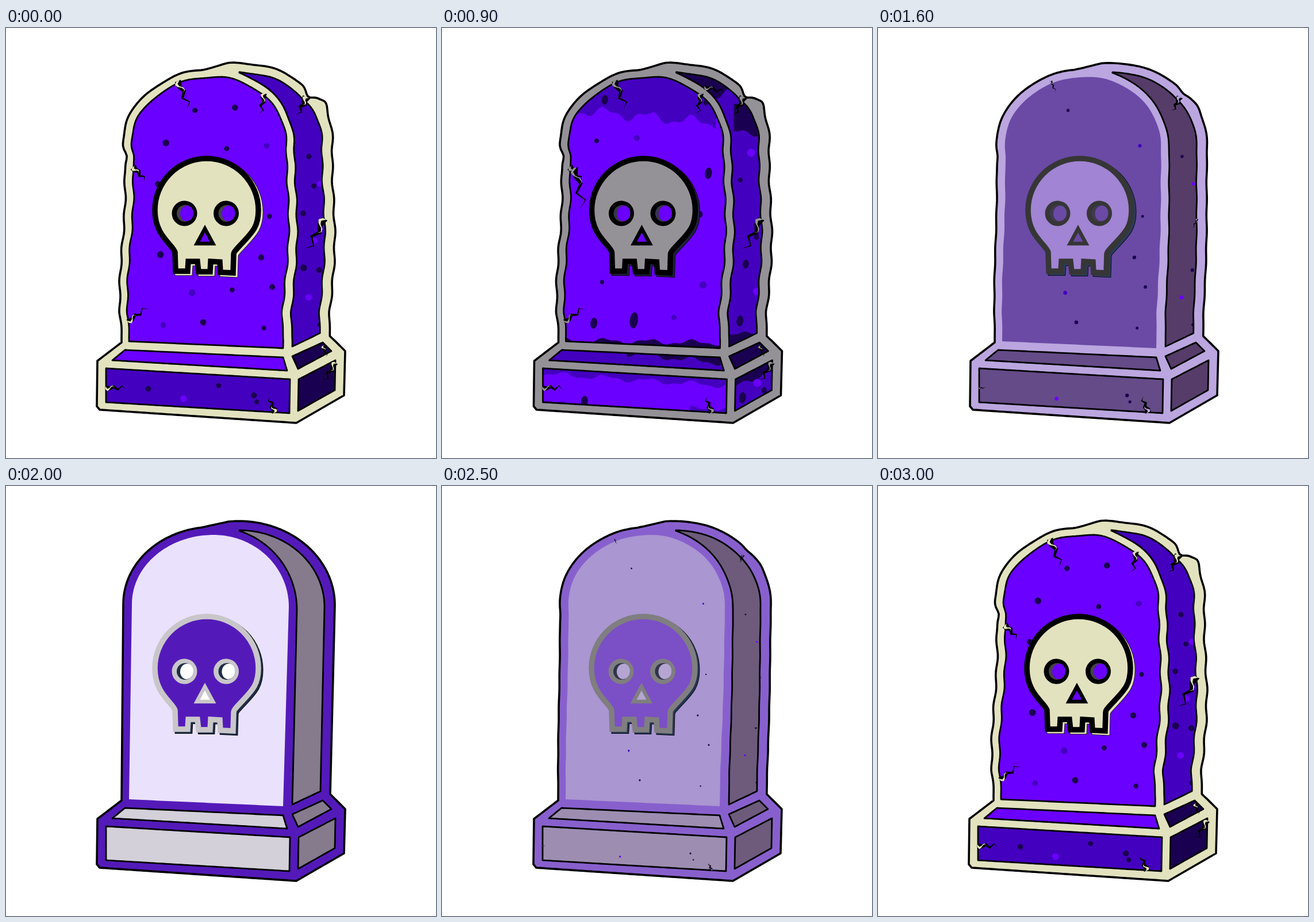
An HTML page with a canvas for the animation above (3.4 s loop, 748 px wide and 748 px high).

```html
<!DOCTYPE html>
<html lang="en">
<head>
<meta charset="utf-8">
<title>Ageing tombstone</title>
<style>
  html, body { margin: 0; width: 100%; height: 100%; overflow: hidden; background: #fff; }
  canvas { display: block; width: 100vmin; height: 100vmin; }
</style>
</head>
<body>
<canvas id="stage" width="748" height="748"></canvas>
<script>
const ctx = document.getElementById('stage').getContext('2d');
ctx.lineJoin = 'round';
const BRIGHT = '#6a00ff', MID = '#4400bf', DARK = '#1a0050';

// Lists of four run through the ages: ancient, old, worn, new.
const COLORS = {
  border:     ['#959297', '#e3e2bf', '#bba6e0', '#541ab9'],
  skull:      ['#959297', '#e3e2bf', '#a184d3', '#541ab9'],
  ink:        ['#000000', '#000000', '#363636', '#c9c6ca'],
  shadow:     ['#20203c', '#e3e2bf', '#2b3b58', '#1d2d45'],
  hollow:     ['#36364a', '#444444', '#403a50', '#1d2d45'],
  hole:       [BRIGHT, BRIGHT, '#6a4aa5', '#ffffff'],
  front:      [BRIGHT, BRIGHT, '#6a4aa5', '#eae2fc'],
  side:       [MID, MID, '#563c69', '#867a8d'],
  ledge:      [MID, BRIGHT, '#654b88', '#d4d0d9'],
  ledgeSide:  [DARK, DARK, '#563c69', '#867a8d'],
  plinth:     [BRIGHT, MID, '#654b88', '#d4d0d9'],
  plinthSide: [MID, DARK, '#563c69', '#867a8d']
};

const clamp = (v, lo, hi) => Math.min(hi, Math.max(lo, v));
const lerp = (a, b, k) => a + (b - a) * k;
const fract = v => v - Math.floor(v);

function arc(cx, cy, rx, ry, from, to) {
  return Array.from({ length: 31 }, (_, i) => {
    const a = lerp(from, to, i / 30) * Math.PI / 180;
    return [cx + rx * Math.cos(a), cy + ry * Math.sin(a)];
  });
}

const OUTLINE = [
  [201, 547], ...arc(361, 205, 157, 134, 180, 262), ...arc(405, 207, 167, 146, 264, 360),
  [564, 536], [590, 562], [588, 639], [505, 687], [163, 664], [158, 658], [159, 579]];

// box: area of the pits; grime: colour, wavy line from left to right, depth towards the edge
const PANELS = {
  front: {
    shape: [[214, 545], ...arc(361, 205, 142, 120, 180, 270), ...arc(361, 210, 131, 125, 270, 360), [482, 557]],
    box: [232, 100, 245, 440], pits: 20, holes: 17, tint: MID,
    grime: [[MID, 220, 142, 475, 166, -100], [DARK, 205, 543, 500, 548, 40]]
  },
  side: {
    shape: [...arc(406, 210, 148, 133, 270, 360), [547, 531], [498, 554], ...arc(361, 215, 145, 144, 360, 288)],
    box: [512, 190, 38, 340], pits: 9, holes: 6, tint: BRIGHT,
    grime: [[DARK, 400, 104, 500, 114, -80], [DARK, 506, 182, 570, 182, -50], [DARK, 490, 540, 560, 522, 40]]
  },
  ledge: {
    shape: [[207, 560], [482, 573], [489, 596], [185, 578]],
    grime: [[DARK, 320, 566, 495, 584, -40]]
  },
  ledgeSide: { shape: [[498, 571], [551, 547], [566, 562], [508, 593]] },
  plinth: {
    shape: [[174, 592], [494, 611], [493, 670], [174, 651]],
    box: [215, 612, 250, 40], pits: 5, holes: 1, tint: BRIGHT,
    grime: [[MID, 165, 601, 500, 623, -40], [MID, 165, 645, 225, 657, 30], [MID, 430, 662, 500, 662, 30]]
  },
  plinthSide: {
    shape: [[509, 611], [573, 578], [572, 630], [508, 666]],
    box: [515, 615, 50, 30], pits: 0, holes: 3, tint: BRIGHT,
    grime: [[DARK, 500, 628, 580, 592, -40]]
  }
};

// Broken spots of the slab: place, push, reach.
const DENTS = [[209, 222, 7, 0, 11], [529, 112, -5, 9, 11], [556, 138, 4, -8, 14]];

// Root, reach, root width, size in the worn age, size in the old age.
const CRACKS = [
  [299, 92, 20, 48, 11, .4, 1],
  [449, 114, -6, 36, 10, 0, 1],
  [221, 242, 22, 23, 12, 0, 1],
  [230, 243, 14, 72, 10, 0, 0],
  [523, 120, -15, 31, 14, .8, 1],
  [455, 103, 36, 8, 8, 0, 0],
  [554, 332, -30, 55, 12, .3, 1],
  [212, 511, 34, -25, 9, 0, 1],
  [173, 626, 36, 0, 9, .35, 1],
  [468, 669, -11, -27, 11, 1, 1],
  [573, 582, -20, 32, 10, 0, 1],
  [551, 553, 8, 18, 8, 0, 1]
];

const SKULL = new Path2D('M294 390C290 376 259 362 259 317A90 90 0 0 1 439 317C439 350 425 358 400 386Q396 390 396 394L395 426L373 425L372 407L356 406L355 424L335 424L333 406L317 406L316 423L295 423Z');
const NOSE = new Path2D('M346 349L332 375L360 375Z');

function along(values, age) {
  const i = clamp(Math.floor(age), 0, 2);
  return lerp(values[i], values[i + 1], age - i);
}

function colorAt(list, age) {
  const channel = k => clamp(Math.round(along(list.map(c => parseInt(c.substr(k, 2), 16)), age)), 0, 255);
  return `rgb(${channel(1)},${channel(3)},${channel(5)})`;
}

// Slow waves along the height plus the dents; the plinth stays straight.
function erode([x, y], rough) {
  const k = rough * clamp((545 - y) / 50, 0, 1);
  const upright = clamp((y - 90) / 120, 0, 1);
  let dx = upright * (4 * Math.sin(y / 54 + 2.48 - (x - 200) / 209) + 1.3 * Math.sin(y / 9));
  let dy = 1.3 * Math.sin(x / 13);
  for (const [px, py, pushX, pushY, reach] of DENTS) {
    const near = Math.exp(-((x - px) ** 2 + (y - py) ** 2) / reach ** 2);
    dx += pushX * near;
    dy += pushY * near;
  }
  return [x + dx * k, y + dy * k];
}

function polygon(pts) {
  const path = new Path2D();
  pts.forEach(p => path.lineTo(...p));
  path.closePath();
  return path;
}

function erodedShape(corners, rough) {
  const pts = [];
  corners.forEach((a, i) => {
    const b = corners[(i + 1) % corners.length];
    const parts = Math.ceil(Math.hypot(b[0] - a[0], b[1] - a[1]) / 6) || 1;
    for (let j = 0; j < parts; j++) {
      pts.push(erode([lerp(a[0], b[0], j / parts), lerp(a[1], b[1], j / parts)], rough));
    }
  });
  return polygon(pts);
}

function fill(path, color) {
  ctx.fillStyle = color;
  ctx.fill(path);
}

function stroke(path, color, width) {
  ctx.strokeStyle = color;
  ctx.lineWidth = width;
  ctx.stroke(path);
}

function blob(x, y, color, rx, ry = rx) {
  if (rx <= 0) return;
  const path = new Path2D();
  path.ellipse(x, y, rx, ry, .12, 0, 7);
  fill(path, color);
}

// Evenly spread places from two irrational strides.
function scatter([x, y, w, h], count, seed, place) {
  for (let i = 1; i <= count; i++) {
    place(x + w * fract(seed + i * .7549), y + h * fract(seed + i * .5698), fract(i * .618), i);
  }
}

function drawGrime([color, x0, y0, x1, y1, depth], decay) {
  const hidden = (1 - decay) * Math.sign(depth) * 45;
  const edge = [[x1, y1 + depth], [x0, y0 + depth]];
  for (let i = 0; i <= 40; i++) {
    const x = lerp(x0, x1, i / 40);
    const size = Math.min(8, Math.abs(depth) / 10);
    edge.push([x, lerp(y0, y1, i / 40) + hidden + size * (Math.sin(x / 12) + .5 * Math.sin(x / 5))]);
  }
  fill(polygon(edge), color);
}

function drawPanel(name, age, rough, color) {
  const { shape, box, pits, holes, tint, grime = [] } = PANELS[name];
  const path = erodedShape(shape, rough);
  const decay = 1 - age;
  fill(path, color[name]);
  ctx.save();
  ctx.clip(path);
  if (decay > 0) grime.forEach(g => drawGrime(g, decay));
  if (box) {
    scatter(box, holes, .37, (x, y, size, i) => {
      const r = (3.5 + 4 * size) * decay;
      blob(x, y, i % 3 ? DARK : tint, r, r * (i % 3 ? 1 + size : 1));
    });
    scatter(box, pits, .11, (x, y, size, i) => {
      const r = 4 + 2 * size;
      blob(x, y, i % 3 ? DARK : tint, along([0, r, i % 2 ? r * .6 : 0, 0], age));
    });
  }
  ctx.restore();
  ctx.globalAlpha = name === 'front' ? clamp(along([1, 1, 0, 0], age), 0, 1) : 1;
  stroke(path, '#000', 2.8);
  ctx.globalAlpha = 1;
}

// A zigzag wedge that runs from full width to a point.
function wedge(x, y, dx, dy, width, part) {
  const length = Math.hypot(dx, dy), nx = -dy / length, ny = dx / length;
  const left = [], right = [];
  for (let i = 0; i <= 5; i++) {
    const t = i / 5 * part;
    const jag = length * .1 * Math.sin(t * 14);
    const half = width / 2 * (1 - i / 5);
    left.push([x + dx * t + nx * (jag + half), y + dy * t + ny * (jag + half)]);
    right.unshift([x + dx * t + nx * (jag - half), y + dy * t + ny * (jag - half)]);
  }
  return polygon(left.concat(right));
}

function drawCracks(age, color) {
  for (const [x, y, dx, dy, width, worn, old] of CRACKS) {
    const g = along([1, old, worn, 0], age);
    if (g <= 0) continue;
    fill(wedge(x, y, dx * g, dy * g, width * g, 1), '#000');
    fill(wedge(x, y, dx * g, dy * g, width * g * .55, .45), color.border);
  }
}

function drawSkull(color) {
  ctx.save();
  ctx.lineJoin = 'miter';
  ctx.translate(3.5, 3);
  stroke(SKULL, '#000', 10);
  stroke(SKULL, color.shadow, 8.5);
  ctx.translate(-3.5, -3);
  fill(SKULL, color.skull);
  stroke(SKULL, color.ink, 9.5);
  for (const x of [310.5, 383]) {
    blob(x, 322.5, color.ink, 22);
    blob(x + 1, 322.5, color.hollow, 14.5);
    blob(x + 4, 322.5, color.hole, 11.5, 13.5);
  }
  fill(NOSE, color.hole);
  stroke(NOSE, color.ink, 6.5);
  ctx.restore();
}

// Steps from the most decayed state (0) to the newest (13), ten per second.
function stepAt(t) {
  const ticks = start => Math.floor((t - start) / 100);
  if (t < 600) return 5 - 5 * ticks(0) / 6;
  if (t < 900) return 0;
  if (t < 2300) return Math.min(13, 1 + ticks(900));
  return Math.max(5, 12 - ticks(2300));
}

function ageAt(step) {
  if (step <= 5) return (step - 1) / 4;
  if (step <= 8) return 1 + (step - 5) / 3;
  return 2 + (step - 8) / 4;
}

function draw(t) {
  const age = ageAt(stepAt(t));
  const rough = clamp(along([1, 1, .35, 0], age), 0, 1);
  const color = {};
  for (const name in COLORS) color[name] = colorAt(COLORS[name], age);

  ctx.fillStyle = '#fff';
  ctx.fillRect(0, 0, 748, 748);
  ctx.save();
  ctx.translate(clamp(along([1.5, 0, 2, 0], age), 0, 2), 0);
  const outline = erodedShape(OUTLINE, rough);
  fill(outline, color.border);
  stroke(outline, '#000', 3.6);
  for (const name in PANELS) drawPanel(name, age, rough, color);
  drawCracks(age, color);
  drawSkull(color);
  ctx.restore();
}

const start = performance.now();
function tick() {
  draw((performance.now() - start) % 3400);
  requestAnimationFrame(tick);
}
tick();
</script>
</body>
</html>
```
